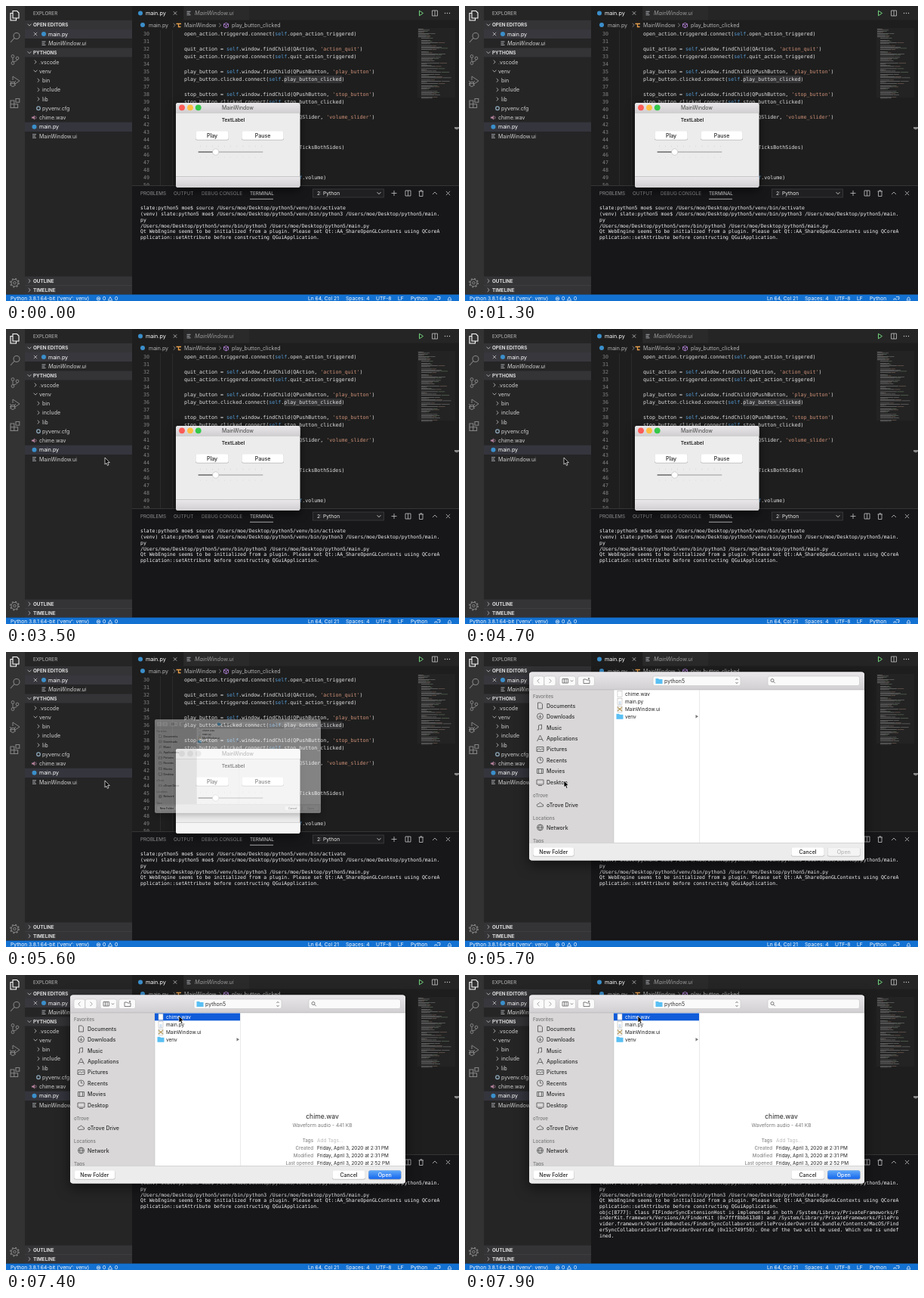
An HTML page that plays this animation: 600x390 px, repeating every 8000 ms.

```html
<!DOCTYPE html>
<html lang="en">
<head>
<meta charset="utf-8">
<title>Editor with file dialog</title>
<style>
html, body { margin: 0; height: 100%; overflow: hidden; background: #1e1e1e; }
svg { display: block; width: 600px; height: 390px; }
text { font-family: Inter, sans-serif; white-space: pre; }
.mono { font-family: "DejaVu Sans Mono", monospace; }
#dialog { filter: drop-shadow(0 5px 9px rgba(0,0,0,.55)); }
</style>
</head>
<body>
<svg id="stage" viewBox="0 0 600 390">
<defs>
  <linearGradient id="bar" x2="0" y2="1"><stop stop-color="#e9e7e9"/><stop offset="1" stop-color="#d1cfd1"/></linearGradient>
  <linearGradient id="blue" x2="0" y2="1"><stop stop-color="#62a9f8"/><stop offset="1" stop-color="#1467ee"/></linearGradient>
</defs>
</svg>
<script>
const stage = document.getElementById('stage');

// Text is placed by the middle of its line.
const text = (x, y, str, size = 7, fill = '#d2d2d2', attrs = '') =>
  `<text x="${x}" y="${y + size * .36}" font-size="${size}" fill="${fill}" ${attrs}>${str}</text>`;
const rect = (x, y, w, h, fill, attrs = '') =>
  `<rect x="${x}" y="${y}" width="${w}" height="${h}" fill="${fill}" ${attrs}/>`;
const circle = (x, y, r, fill, attrs = '') => `<circle cx="${x}" cy="${y}" r="${r}" fill="${fill}" ${attrs}/>`;
const line = (d, stroke = '#c5c5c5', width = .8, attrs = '') =>
  `<path d="${d}" fill="none" stroke="${stroke}" stroke-width="${width}" ${attrs}/>`;
const shape = (d, fill) => `<path d="${d}" fill="${fill}"/>`;
const group = (id, body) => `<g id="${id}">${body}</g>`;
const right = (x, y, color) => line(`M${x - 1.3} ${y - 2.4}l2.5 2.4l-2.5 2.4`, color);
const down = (x, y, color) => line(`M${x - 2.4} ${y - 1.3}l2.4 2.5l2.4-2.5`, color);
const cross = (x, y, r = 2.2, color) => line(`M${x - r} ${y - r}l${2 * r} ${2 * r}m0 ${-2 * r}l${-2 * r} ${2 * r}`, color);
const BOLD = 'font-weight="700"', MEDIUM = 'font-weight="500"', ITALIC = 'font-style="italic"';
const MIDDLE = 'text-anchor="middle"', END = 'text-anchor="end"', MONO = 'class="mono"';

const pyIcon = (x, y) => circle(x, y, 3, '#3b8fcb');
const listIcon = (x, y) => line(`M${x - 2.5} ${y - 2.2}h5m-5 2.2h4m-4 2.2h5`, '#b9bcc0', .9);
const soundIcon = (x, y) => shape(`M${x - 3} ${y - 1}h2l2-2v6l-2-2h-2z`, '#b884a0') +
  line(`M${x + 2} ${y - 2}q2 2 0 4`, '#b884a0');

function activityBar() {
  const dim = '#858585';
  return rect(0, 0, 25, 381, '#333333') +
    line('M9 6.5h5.5l2.5 2.5v7h-8zM9 9.5h-3v9.500h7.500v-3', '#fff', 1.1) +
    line('M18 39.500a4 4 0 1 1-8 0a4 4 0 1 1 8 0M11 42.500l-5 5.500', dim, 1.1) +
    circle(9, 66.5, 1.9, 'none', `stroke="${dim}"`) + circle(9, 75.5, 1.9, 'none', `stroke="${dim}"`) +
    circle(15, 69, 1.9, 'none', `stroke="${dim}"`) + line('M9 68.500v5M15 71q0 2-5.500 3', dim, 1) +
    line('M9 98v-5l9 6l-6 4M6.500 100.500h5v3.500a2.500 2.500 0 0 1-5 0zM5 99l1.500 1.500M5 105l1.500-1M13 99l-1.500 1.500M13 105l-1.500-1M5 102.500h8', dim, 1) +
    line('M6 125h4.800v9.500h-4.800zM6 129.800h9.600v4.700h-9.600zM13 122.500h4.800v4.700h-4.800z', dim, 1.1) +
    circle(11.500, 366, 4.500, 'none', `stroke="${dim}" stroke-width="1.1"`) + circle(11.500, 366, 1.700, 'none', `stroke="${dim}"`) +
    circle(11.500, 366, 5.700, 'none', `stroke="${dim}" stroke-width="1.400" stroke-dasharray="2 2.477"`);
}

function sidebar() {
  const header = (y, name, arrow) => rect(25, y - 6, 142, 12, '#343437') +
    arrow(31, y) + text(36, y, name, 6.3, '#dedede', BOLD);
  const folder = (x, y, name, arrow) => arrow(x - 5, y) + text(x, y, name);
  return rect(25, 0, 142, 381, '#252526') + text(36, 9.5, 'EXPLORER', 6.3, '#bbb') +
    header(25, 'OPEN EDITORS', down) + header(61.5, 'PYTHONS', down) +
    rect(25, 31, 142, 12, '#37373d') + cross(39, 37) + pyIcon(50, 37) + text(56, 37.2, 'main.py', 7, '#fff') +
    listIcon(50, 49.3) + text(56, 49.3, 'MainWindow.ui', 7, '#d2d2d2', ITALIC) +
    folder(44, 74, '.vscode', right) + folder(44, 86, 'venv', down) +
    folder(48, 98.300, 'bin', right) + folder(48, 110.700, 'include', right) + folder(48, 123, 'lib', right) +
    circle(43, 135.200, 2.3, 'none', 'stroke="#8ba5b5" stroke-width="1.3"') + text(48, 135.200, 'pyvenv.cfg') +
    soundIcon(37, 147.500) + text(44, 147.500, 'chime.wav') +
    rect(25, 153.700, 142, 12.300, '#34353d') + pyIcon(37.500, 159.800) + text(44, 159.800, 'main.py', 7, '#fff') +
    listIcon(37.500, 172) + text(44, 172, 'MainWindow.ui') +
    header(363.500, 'OUTLINE', right) + header(375.500, 'TIMELINE', right) + line('M25 369.500h142', '#4a4a4c', .5);
}

const CODE = {
  30: 'open_action.triggered.connect(self.open_action_triggered)',
  32: "quit_action = self.window.findChild(QAction, 'action_quit')",
  33: 'quit_action.triggered.connect(self.quit_action_triggered)',
  35: "play_button = self.window.findChild(QPushButton, 'play_button')",
  36: 'play_button.clicked.connect(self.play_button_clicked)',
  38: "stop_button = self.window.findChild(QPushButton, 'stop_button')",
  39: 'stop_button.clicked.connect(self.stop_button_clicked)',
  41: "volume_slider = self.window.findChild(QSlider, 'volume_slider')",
  45: 'volume_slider.setTickPosition(QSlider.TicksBothSides)',
  49: 'volume_slider.valueChanged.connect(self.volume)'
};
const highlight = code => code.replace(/'[^']*'|self/g,
  part => `<tspan fill="${part === 'self' ? '#569cd6' : '#ce9178'}">${part}</tspan>`);

function minimap() {
  let seed = 11, out = rect(545, 29, 50, 92, '#ffffff', 'opacity=".025"');
  const random = () => (seed = seed * 16807 % 2147483647) / 2147483647;
  for (let i = 0; i < 62; i++) {
    if (i > 8 && i % 5 === 4) continue;
    const x = i < 8 ? 546 : 550, width = 7 + random() * (i > 10 && i < 50 ? 34 : 18);
    const y = 30 + i * 1.5;
    out += rect(x, y, width * .7, .7, '#a5a5a5', 'opacity=".6"') +
      rect(x + width * .72, y, width * .28, .7, ['#a08070', '#999', '#7d9a7a'][i % 3], 'opacity=".6"');
  }
  return out + shape('M594 160h6v2l-3 1.500l-3-1.500z', '#8a8a8a');
}

function editor() {
  let out = rect(167, 0, 433, 381, '#1e1e1e') + rect(167, 0, 433, 18.500, '#252526') +
    rect(167, 0, 68, 18.500, '#1e1e1e') + rect(235.500, 0, 86.500, 18.500, '#2a2a2b') +
    pyIcon(178, 9.500) + text(185, 9.500, 'main.py', 7.200, '#fff') + cross(224, 9.500) +
    listIcon(242, 9.500) + text(250, 9.500, 'MainWindow.ui', 7.200, '#999', ITALIC) +
    line('M547.500 6.200l5 3.300l-5 3.300z', '#73d47c', 1) +
    line('M564.500 6h7v7h-7zM568 6v7') + [581.500, 584.500, 587.500].map(x => circle(x, 9.500, .7, '#ccc')).join('') +
    pyIcon(181, 25) + text(189, 25.300, 'main.py', 7, '#b2b2b2') + right(223, 25.300, '#999') +
    line('M225.500 23.500h3v4h3M229 23.500h3', '#e8a04c', 1.300) + text(236, 25.300, 'MainWindow', 7, '#b2b2b2') +
    right(283.500, 25.300, '#999') + line('M288.500 23.800l3-1.500l3 1.500v3.500l-3 1.500l-3-1.500zl3 1.500l3-1.500m-3 1.500v3.500', '#b180d7', .9) +
    text(299, 25.300, 'play_button_clicked', 7, '#b2b2b2') +
    line('M204.500 32v205M220.500 32v205', '#383838', .5) + rect(368.500, 92, 76.500, 10, '#343436');
  for (let n = 30; n <= 50; n++) {
    const y = 37 + (n - 30) * 10;
    out += text(190, y, n, 6.670, '#858585', `${MONO} ${END}`);
    if (CODE[n]) out += text(236, y, highlight(CODE[n]), 6.670, '#e2e2e2', MONO);
  }
  return out + minimap();
}

const SHELL = [
  'slate:python5 moe$ source /Users/moe/Desktop/python5/venv/bin/activate',
  '(venv) slate:python5 moe$ /Users/moe/Desktop/python5/venv/bin/python3 /Users/moe/Desktop/python5/main.py',
  '/Users/moe/Desktop/python5/venv/bin/python3 /Users/moe/Desktop/python5/main.py',
  'Qt WebEngine seems to be initialized from a plugin. Please set Qt::AA_ShareOpenGLContexts using QCoreApplication::setAttribute before constructing QGuiApplication.'
];
const WARNING = ['objc[8777]: Class FIFinderSyncExtensionHost is implemented in both /System/Library/PrivateFrameworks/FinderKit.framework/Versions/A/FinderKit (0x7fff8bb613d8) and /System/Library/PrivateFrameworks/FileProvider.framework/OverrideBundles/FinderSyncCollaborationFileProviderOverride.bundle/Contents/MacOS/FinderSyncCollaborationFileProviderOverride (0x11c749f50). One of the two will be used. Which one is undefined.'];
const shellText = (y, lines) => lines.flatMap(s => s.match(/.{1,102}/g))
  .map((s, i) => text(178, y + i * 7.730, s, 6.465, '#f4f4f4', MONO)).join('');

function panel() {
  const tab = (x, name, color = '#8f8f8f') => text(x, 247.500, name, 6.300, color);
  return rect(167, 237, 433, 144, '#171619') + rect(167, 237, 433, .7, '#444') +
    tab(178, 'PROBLEMS') + tab(222, 'OUTPUT') + tab(259, 'DEBUG CONSOLE') + tab(323, 'TERMINAL', '#eee') +
    rect(323, 254.800, 31, .7, '#e7e7e7') +
    rect(406.500, 242, 94, 11, '#202022', 'stroke="#48484a" stroke-width=".6"') +
    text(412, 247.600, '2: Python', 6.700, '#eee') + down(494, 247.500, '#eee') +
    line('M510.500 247.500h7m-3.500-3.500v7M529 244h7v7h-7zM532.500 244v7M546.500 245h6.500M547.500 245v6.500h4.500v-6.500M548.800 245v-1.200h2v1.200M565 249l3-3l3 3') +
    cross(585.500, 247.500, 2.600) + shellText(267, SHELL);
}

function statusBar() {
  const item = (x, str) => text(x, 387, str, 6.700, '#fff');
  return rect(0, 381.500, 600, 8.500, '#1371d2') + item(6, "Python 3.8.1 64-bit ('venv': venv)") +
    circle(122.500, 387, 2.300, 'none', 'stroke="#fff" stroke-width=".7"') + cross(122.500, 387, 1, '#fff') + item(128, '0') +
    line('M138 384.500l2.700 4.700h-5.400z', '#fff', .7) + item(144, '0') +
    item(400, 'Ln 64, Col 21') + item(450, 'Spaces: 4') + item(490, 'UTF-8') + item(519, 'LF') + item(536, 'Python') +
    line('M568 389v-2h3v2M571 384.500h4v3h-2M585 389q1-1 1-3q1.500-2 3 0q0 2 1 3z', '#fff', .7);
}

function button(x, y, w, label, fill = '#fff', color = '#222') {
  return rect(x, y + .4, w, 12, '#b5b5b5', 'rx="2.500"') + rect(x + .3, y + .3, w - .6, 11.400, fill, 'rx="2.300"') +
    text(x + w / 2, y + 6.200, label, 7, color, `${MIDDLE} ${MEDIUM}`);
}

function mainWindow() {
  let ticks = '';
  for (let i = 0; i < 11; i++) ticks += rect(257 + i * 8.100, 184.500, .5, 2, '#cfcfcf') + rect(257 + i * 8.100, 199, .5, 2, '#dcdcdc');
  const lights = (a, b, c) => circle(233, 134.300, 3.900, a) + circle(244, 134.300, 3.900, b) + circle(254.700, 134.300, 3.900, c);
  return rect(225, 128, 164.500, 112, '#ececec', 'rx="3" style="filter:drop-shadow(0 4px 6px #0009)"') +
    shape('M225 141v-10q0-3 3-3h158.500q3 0 3 3v10z', 'url(#bar)') + rect(225, 141, 164.500, .5, '#b5b5b5') +
    lights('#fc5b57', '#fdbe3f', '#34c84a') + text(307, 134.700, 'MainWindow', 6.900, '#444', MIDDLE) +
    text(301, 151, 'TextLabel', 6.500, '#222', `${MIDDLE} font-weight="600"`) + button(251, 165, 44, 'Play') + button(312, 165, 56, 'Pause') +
    ticks + rect(254.500, 192.300, 86, 1.400, '#b5b5b5', 'rx=".7"') + rect(254.500, 192.300, 23, 1.400, '#777', 'rx=".7"') +
    circle(277.700, 193, 4.200, '#fff', 'stroke="#aaa" stroke-width=".5"') + rect(225, 225, 164.500, .7, '#a8a8a8') +
    shape('M225 225.700h164.500v11.300q0 3-3 3h-158.500q-3 0-3-3z', 'url(#bar)') +
    group('inactive', shape('M225 141v-10q0-3 3-3h158.500q3 0 3 3v10z', '#f5f5f5') + lights('#d8d8d8', '#d8d8d8', '#d8d8d8') +
      text(307, 134.700, 'MainWindow', 6.900, '#777', MIDDLE) +
      shape('M225 225.700h164.500v11.300q0 3-3 3h-158.500q-3 0-3-3z', '#f5f5f5'));
}

function dialog() {
  const gray = '#5f5f5f', box = (x, w) => rect(x, 32, w, 12.500, '#fafafa', 'rx="2.500" stroke="#bcbcbc" stroke-width=".5"');
  const folder = (x, y) => shape(`M${x - 4.500} ${y - 3.500}h3.500l1 1h4.500v6h-9z`, '#59bff3');
  const page = (x, y) => rect(x - 3, y - 4, 6, 8, '#fff', 'stroke="#aaa" stroke-width=".5"');
  const heading = (y, name) => text(90, y, name, 6.200, '#777', MEDIUM);
  const place = (y, name, icon) => text(108, y + .3, name, 7, '#2c2c2c', MEDIUM) + line(`M99.500 ${y}${icon}`, gray, .9);
  const field = (y, name, value, color = '#222') => text(407, y, name, 6.200, '#888', `${END} ${MEDIUM}`) + text(412, y, value, 6.450, color);
  const screen = 'm-4.500-3h9v6h-9zm2 7.500h5';
  const preview = text(419, 187, 'chime.wav', 8.600, '#222', MIDDLE) + text(419, 198.500, 'Waveform audio - 441 KB', 6.600, '#777', MIDDLE) +
    field(218.500, 'Tags', 'Add Tags...', '#bbb') + field(228.700, 'Created', 'Friday, April 3, 2020 at 2:31 PM') +
    field(239, 'Modified', 'Friday, April 3, 2020 at 2:31 PM') + field(249, 'Last opened', 'Friday, April 3, 2020 at 2:52 PM');
  return rect(85, 26.500, 444, 249, '#ececec', 'rx="4"') +
    shape('M85 50v-19.500q0-4 4-4h436q4 0 4 4v19.500z', 'url(#bar)') + rect(85, 50, 112, 202, '#d9d7d8') + rect(197, 50, 332, 202, '#fff') +
    rect(85, 49.700, 444, .5, '#aaa') + rect(196.700, 50, .6, 202, '#c2c2c2') + rect(310, 50, .6, 202, '#ddd') +
    box(90, 14.500) + box(105, 15) + box(125, 21.500) + box(149.500, 22) + box(249, 116) + box(401, 121.500) +
    line('M98.500 35.500l-2.800 2.800l2.800 2.800M111.500 35.500l2.800 2.800l-2.800 2.800', '#999', .9) +
    line('M129 35.500h7.500v5.500h-7.500zm2.500 0v5.500m2.500-5.500v5.500M140 37.500l1.500 1.500l1.500-1.500M157 36h3l1 1h4v4.500h-8zm7 0v-2m-1 1h2', gray) +
    folder(257, 38.500) + text(264, 38.700, 'python5', 7, '#333') + line('M358.500 37l1.500-1.700l1.500 1.700M358.500 40l1.500 1.700l1.500-1.700', gray) +
    circle(407, 37.500, 2, 'none', `stroke="${gray}" stroke-width=".8"`) + line('M408.500 39l2.200 2.200', gray) +
    heading(58.500, 'Favorites') + place(71, 'Documents', 'm-3-4h4l2 2v6h-6z') +
    place(85, 'Downloads', 'm4 0a4 4 0 1 1-8 0a4 4 0 1 1 8 0m-4-2v4m-2-2l2 2l2-2') +
    place(100, 'Music', 'm-2 3v-6l4-1v6m-4 1h-2m6-1h-2') + place(114, 'Applications', 'm-4 4l4-8l4 8m-6-2.500h5') +
    place(128.500, 'Pictures', 'm-4.500-3h9v6h-9zm0 5l3-3l2 2l2-2l2 2') +
    place(143, 'Recents', 'm4 0a4 4 0 1 1-8 0a4 4 0 1 1 8 0m-4-3v3h2') +
    place(157.500, 'Movies', 'm-4-3h8v6h-8zm2 0v6m4-6v6') + place(172, 'Desktop', screen) +
    heading(189.500, 'oTrove') + place(202, 'oTrove Drive', 'm-3 2.500q-2-.500-1-3q1-1 2-.500q2-4 4 0q3 0 2 3z') +
    heading(219.500, 'Locations') + place(232, 'Network', 'm4 0a4 4 0 1 1-8 0a4 4 0 1 1 8 0h-8m4-4q-4 4 0 8q4-4 0-8') + heading(249.500, 'Tags') +
    page(205, 55.300) + page(205, 65.300) + page(205, 75.300) + line('M203.500 66h3m-3 2h3', '#8fb4d8') + line('M202 73l6 5m0-5l-6 5', '#b59a5f', 1.300) +
    folder(205, 85.300) + text(212, 55.500, 'chime.wav', 6.500, '#222') + text(212, 65.500, 'main.py', 6.500, '#222') +
    text(212, 75.500, 'MainWindow.ui', 6.500, '#222') + text(212, 85.500, 'venv', 6.500, '#222') + shape('M305.500 83l3.500 2.200l-3.500 2.200z', '#777') +
    group('preview', rect(197, 50.500, 113, 9.800, '#105cd9') + page(205, 55.300) + text(212, 55.500, 'chime.wav', 6.500, '#fff') + preview) +
    shape('M85 252h444v19.500q0 4-4 4h-436q-4 0-4-4z', '#ececec') + rect(85, 252, 444, .5, '#bbb') +
    button(90, 258, 54.500, 'New Folder') + button(432, 258, 44, 'Cancel') + button(480, 258, 43.500, 'Open', '#f4f4f4', '#b5b5b5') +
    group('ready', button(480, 258, 43.500, 'Open', 'url(#blue)', '#fff'));
}

stage.innerHTML += activityBar() + sidebar() + editor() + panel() + group('warning', shellText(313.400, WARNING)) +
  statusBar() + mainWindow() + group('dialog', dialog()) +
  group('pointer', '<path d="M0 0v9l2-1.800l1.400 3.200l1.600-.7l-1.400-3.100h2.700z" fill="#000" stroke="#fff" stroke-width=".7"/>');

// Pointer stops: time, x, y
const PATH = [[2200, 38, -11], [2500, 43, 11], [3200, 131, 170], [6000, 131, 170], [6800, 230, 46], [6900, 229, 54], [8000, 229, 54]];
function pointerAt(t) {
  const i = PATH.findIndex(stop => stop[0] > t);
  if (i < 1) return [0, -20];
  const [t0, x0, y0] = PATH[i - 1], [t1, x1, y1] = PATH[i];
  const u = (t - t0) / (t1 - t0), ease = u * u * (3 - 2 * u);
  return [x0 + (x1 - x0) * ease, y0 + (y1 - y0) * ease];
}

const part = id => document.getElementById(id);
const show = (id, on) => part(id).setAttribute('visibility', on ? 'visible' : 'hidden');

function draw(now) {
  const t = Math.floor(now % 8000 / 100) * 100;
  const opening = t < 5700;
  part('dialog').setAttribute('display', t < 5600 ? 'none' : 'inline');
  part('dialog').setAttribute('opacity', opening ? .45 : 1);
  part('dialog').setAttribute('transform', opening ? 'translate(307 151) scale(.495) translate(-307 -151)' : '');
  show('inactive', t >= 5600);
  show('preview', t >= 7100);
  show('ready', t >= 7100);
  show('warning', t >= 7600);
  part('pointer').setAttribute('transform', `translate(${pointerAt(t)})`);
  requestAnimationFrame(() => draw(performance.now()));
}
draw(performance.now());
</script>
</body>
</html>
```
